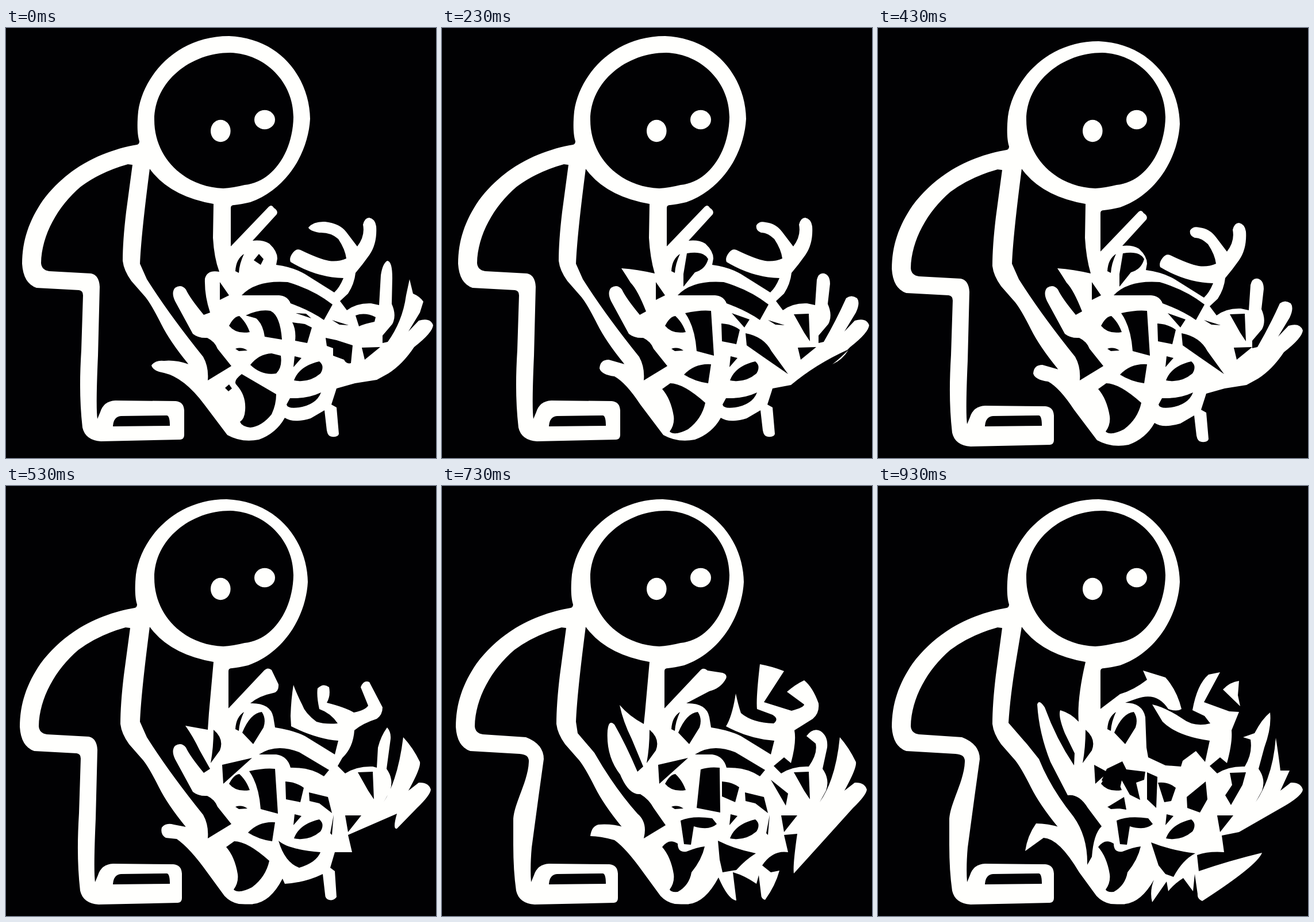
These frames come from a looping animation (748x748 px, 1030 ms). An HTML page:

```html
<!DOCTYPE html>
<html lang="en">
<head>
<meta charset="utf-8">
<title>Stick figure with a bundle</title>
<style>
  html, body { margin: 0; width: 100%; height: 100%; overflow: hidden; background: #010103; }
  svg { display: block; width: 100vw; height: 100vh; }
</style>
</head>
<body>
<svg viewBox="0 0 748 748">
  <g fill="#fffffd"><path id="body"/><path id="bundle"/></g>
  <path id="gaps" fill="#010103"/>
  <g fill="#fffffd">
    <ellipse cx="373.3" cy="179" rx="17.3" ry="19.3"/>
    <ellipse cx="450" cy="159.5" rx="18" ry="16.7"/>
  </g>
</svg>
<script>
const el = id => document.getElementById(id);
const LOOP = 1030, FIRST = 30, STEP = 100;
const HOME = 'translate(0 0)', LOW = 'translate(-4 9)';

// Body: back, leg, shoe and arm around the head.
const head = 'M391 381 L391 313 Q391 308 397 308 Q408 307 425 303 C490 280 526 215 529 158 C528 90 480 18 388 14 C295 14 238 85 230 145 C228 165 228 185 232 197 Q232 202 228 203';
const back = 'C175 212 110 238 64 300 C40 335 28 370 28 410 Q30 444 53 452';
const shoe = 'Q138 717 165 719 L303 716 Q310 715 310 708 V665 Q309 650 295 649 L190 648 Q170 649 164 668 L159 680';
const arm = 'L75 423 Q62 421 61 409 C62 360 90 310 130 276 Q165 250 212 237 L220 238 L209 320 Q203 370 203 405 Q205 422 218 440 L239 464 Q250 475 270 515 Q285 545 316 583 L351 640Z';
const legs = {
  straight: ['L127 456 Q134 457 134 465 L131 560 C128 610 128 650 133 695', 'Q156 660 160 570 L163 450 Q162 430 148 427'],
  bent: ['L139 457 Q156 458 155 471 C154 505 128 545 128 573 V615 Q128 660 133 695', 'Q157 655 160 620 L172 531 L181 466 Q181 440 150 428']
};
const makeBody = ([outer, inner]) => head + back + outer + shoe + inner + arm;

// Bundle silhouettes.
const twigs = (tip, stem, fork, edge, hand) =>
  'M388 383 L457 311 Q462 306 466 313 Q474 318 471 324 L429 370 Q446 368 458 375 Q472 388 472 401 L470 412 Q500 416 520 428 L571 460 Q580 452 587 435 Q540 434 495 407 Q492 400 499 391 Q505 383 512 386 Q545 402 562 405 Q578 407 592 401 Q590 385 578 367 ' +
  tip + ' Q581 340 592 355 L611 380 Q625 362 621 342 Q624 330 632 330 Q642 332 644 345 Q646 375 632 395 Q620 412 608 426 Q606 445 595 462 L581 475 L593 491 Q610 478 635 479 L649 482 ' +
  stem + ' L671 480 Q680 500 672 515 L655 535 L655 548 L664 546 ' + fork +
  ' L700 528 L718 509 Q738 503 743 517 Q742 530 710 555 ' + edge +
  ' L575 627 L566 655 L575 660 L579 706 Q578 712 567 711 Q560 711 558 700 L554 665 L530 679 Q500 688 485 678 Q470 705 440 716 Q410 722 385 708 L345 655 ' + hand;
const roundTip = 'Q565 355 555 356 Q545 352 547 343 Q552 335 563 338';
const roundStem = 'L652 438 Q655 425 665 427 Q675 430 675 445';
const roundFork = 'Q685 510 703 470 Q712 463 722 470 Q728 478 720 495';
const roundHand = 'Q320 617 300 606 Q277 603 274 592 Q275 577 290 577 L318 585Z';
const fullEdge = 'Q690 585 665 601 L645 612 L607 618';

const bundle = {
  pointed: twigs('Q565 355 545 356 Q528 353 526 347 Q535 336 555 337',
    'L652 430 Q655 410 663 405 Q672 405 672 435',
    'Q690 510 696 465 L702 437 L708 462 Q720 467 726 476 L720 495',
    fullEdge, 'Q310 608 275 600 Q256 597 253 587 Q260 577 275 579 Q295 577 318 585Z'),
  round: twigs(roundTip, roundStem, roundFork, fullEdge, roundHand),
  cut: twigs(roundTip, roundStem, roundFork, 'L705 560 Q650 585 607 621', roundHand) +
    'M707 560 Q697 577 679 585 Q692 575 707 560Z'
};

const midStrand = 'Q460 377 465 402 L468 420 Q500 425 520 435 L572 467 L578 443';
const rightFork = 'Q722 490 700 530 L718 516 Q735 515 739 528 Q738 538 715 560';
const knot = 'Q430 728 405 727 Q390 724 380 713 L350 672';
const joint = 'L577 487 L590 500 Q610 487 638 488';
const stemBase = 'L662 492 Q675 510 668 530 L657 550';

bundle.sharp =
  'M384 390 L448 322 Q455 314 462 320 L474 345 Q475 358 465 360 Q440 365 425 378 ' + midStrand +
  'Q540 440 496 418 L495 400 Q496 370 500 346 Q505 360 515 380 Q520 395 540 410 Q555 415 577 413 Q565 395 545 388 Q540 365 542 352 Q552 342 562 350 Q565 365 558 377 Q590 385 605 394 Q625 390 630 382 L617 350 Q622 337 632 341 L655 385 Q655 398 645 405 Q620 413 606 425 Q604 455 585 473' +
  joint + 'L645 490 L647 455 Q652 435 663 420 Q670 428 669 440' + stemBase +
  'Q682 510 691 437 Q708 455 720 480' + rightFork +
  'L680 596 Q672 598 680 570 L595 607 L602 637 L572 637 L564 664 L572 670 L575 715 Q570 722 562 720 Q555 718 555 710 L551 675 Q520 690 485 692 L481 683 Q460 724 430 727' + knot +
  'Q320 630 297 614 L278 612 Q268 606 271 594 Q278 585 292 589 L318 594Z';

bundle.flared =
  'M384 390 L450 320 Q455 315 462 321 L488 325 Q497 328 494 335 Q485 352 465 357 L425 378 ' + midStrand +
  'Q535 440 494 418 Q505 400 511 361 Q515 380 520 395 Q540 412 577 413 Q587 405 575 398 L548 388 Q546 370 553 310 Q575 314 595 322 L560 376 L608 391 Q630 385 630 380 L600 358 Q615 345 630 338 Q645 350 655 378 Q657 395 645 405 L613 425 Q617 445 607 482 L595 472' +
  joint + 'Q654 465 650 448 L634 435 Q645 420 658 426 Q672 435 670 455' + stemBase +
  'Q685 510 692 437 Q708 455 720 480' + rightFork +
  'Q670 610 612 674 Q610 660 618 605 L595 607 L602 637 Q575 633 557 660 L572 672 L587 669 Q580 695 562 720 Q555 718 555 710 L551 677 L547 692 Q525 677 506 672 L512 721 Q498 720 481 681 Q458 724 430 727' + knot +
  'Q320 630 300 616 Q275 609 258 609 Q260 592 272 589 Q295 587 318 594Z';

bundle.torn =
  'M384 390 L421 362 Q445 355 468 337 L461 321 L500 333 Q520 355 528 388 Q520 393 505 388 Q485 357 450 370 L430 377 Q460 377 465 402 L467 455 L470 472 L500 486 L527 488 L530 478 L553 461 L569 480 L577 443 Q520 435 495 410 L477 380 Q500 385 530 405 Q550 420 578 413 L568 400 L547 390 Q555 345 575 328 L595 324 L567 376 L611 392 L628 393 L615 425 Q617 445 607 482 L595 472' +
  joint + 'Q652 465 648 441 L635 437 L655 430 Q668 405 682 394 Q685 420 672 455' + stemBase +
  'Q687 505 692 438 Q697 470 700 495 L716 495 L700 530 L718 516 Q735 515 739 528 Q738 538 710 555 ' +
  'L628 602 L598 608 L602 637 Q575 635 555 642 L558 670 Q610 652 668 638 Q660 660 564 722 Q555 718 556 710 L551 675 L548 705 L531 682 Q515 692 505 705 L502 688 L477 724 Q472 705 480 685 Q458 724 430 727' + knot +
  'Q315 613 288 612 L256 635 Q260 608 275 587 Q295 587 318 594Z M600 354 Q612 341 628 339 L626 364 L630 383Z';

// Dark gaps; the space under the head reaches the twigs on the left.
const fixed = 'M500 155 C499 215 465 268 415 273 Q395 278 378 279 C312 277 258 227 258 160 C258 93 321 43 390 43 C452 45 500 95 500 155Z M186 693 Q187 676 200 675 L280 674 Q285 675 285 692Z M388 518 Q396 502 406 501 Q418 512 424 529 Q400 533 388 518Z M399 558 Q410 554 420 561 L405 562Z M399 423 Q400 402 414 393 Q406 410 405 426Z';
const chest = 'M250 245 Q285 293 361 306 ';
const leftTwig = 'L344 499 Q320 470 313 455 Q305 445 294 452 Q287 460 294 475 L325 532 Q335 540 350 539 Q363 545 368 558 L392 588 L351 613 Q353 590 343 572 ';
const armSide = 'Q285 500 245 437 L233 410 Q235 360 250 245Z ';
const space = {
  loop: chest + 'L360 365 Q362 400 371 424 Q350 420 346 436 Q345 465 355 495 ' + leftTwig + armSide,
  spike: chest + 'L360 365 Q362 400 370 427 Q340 420 312 418 Q320 430 328 443 Q340 455 355 493 ' + leftTwig + armSide,
  narrow: chest + 'L353 395 L351 424 L312 417 Q325 435 337 460 L355 492 ' + leftTwig + armSide,
  split: chest + 'L353 395 L351 414 Q325 400 309 381 Q315 410 330 440 L350 488 L340 497 Q320 450 300 415 Q290 405 288 425 Q285 470 310 502 Q325 538 345 536 Q360 545 368 560 L389 590 L351 613 Q358 585 340 570 Q300 525 265 464 L236 430 L233 410 Q235 360 250 245Z ',
  wide: chest + 'Q346 370 349 410 Q335 395 317 390 Q313 400 325 430 L342 465 L341 486 Q310 440 290 385 Q280 370 277 380 Q280 430 300 480 L330 538 Q350 535 365 560 L389 592 Q375 605 372 645 L364 659 Q365 610 340 575 Q300 525 280 475 L260 450 L227 412 Q230 365 240 305 L250 245Z '
};

const eyelet = {
  small: 'M440 393 L448 402 L443 412 L431 404Z ',
  sliver: 'M463 384 L440 411 L431 405 Q434 396 445 393Z ',
  large: 'M420 428 L426 392 Q455 387 463 402 Q458 420 440 425 L420 450Z ',
  leaf: 'M411 429 Q425 395 445 393 Q453 405 448 420 L430 449Z '
};

const arch = 'M410 465 Q435 438 490 442 Q535 455 568 481 L553 508 Q530 492 495 479 Q490 466 475 465Z M372 442 L388 465 L372 473Z ';
const sole = 'M494 644 Q525 645 548 634 Q540 655 510 660 Q490 663 488 655Z ';
const notch = 'M619 556 L651 555 L624 577Z ';
const bean = 'M501 613 Q510 588 545 580 Q555 588 547 601 Q527 618 501 613Z M502 571 L514 574 L500 590Z ';
const wovenGaps = arch + sole + notch + bean +
  'M417 500 Q440 489 460 492 Q477 500 480 542 L450 537 Q447 515 435 505Z M498 512 L520 515 L532 521 L524 548 L503 544 Q505 525 498 512Z M556 539 L575 543 L603 552 L600 583 Q592 585 588 577 L569 570 L569 557 L558 553Z M425 586 Q440 567 462 566 L478 570 Q481 590 470 601 Q445 605 425 586Z ' +
  'M608 500 Q625 494 643 503 L641 511 Q625 514 614 519Z M410 602 L470 637 Q470 655 462 672 Q445 693 425 695 Q410 693 407 685 Q415 680 416 665 Q418 640 402 622 Q393 615 410 602Z M381 626 L388 620 L393 627 L387 632Z M567 508 L596 517 L580 516Z M504 496 L531 505 L522 497Z';

const bowl = 'M383 628 L397 618 Q420 618 458 652 Q452 680 428 698 Q405 710 396 702 Q405 690 403 675 Q398 645 383 628Z ';
const column = 'M423 496 Q450 490 468 492 L473 570 L443 562 Q440 520 423 496Z ';
const pane = 'M486 514 Q505 515 518 525 L512 550 L487 545Z ';
const cap = 'M421 603 Q440 583 468 585 L463 618 Q440 615 421 603Z ';
const slot = 'M612 498 L638 497 L640 545 L630 530Z ';
const looseGaps = arch + sole + notch + bean + bowl + column + pane + cap + slot +
  'M528 531 Q560 537 573 562 L602 602 L560 573 L530 552Z M567 508 L596 517 L580 516Z M504 496 L526 521 L535 507Z ';

const brokenArch = 'M440 467 Q470 447 510 463 L562 494 L553 505 Q530 489 495 490 Q490 470 470 467Z ';
const crack = 'M361 424 Q380 440 372 460 L356 482 Q361 455 361 424Z ';
const wedges = crack + 'M376 485 L428 473 L378 518Z ';
const flag = 'M590 573 L618 573 L595 602Z ';
const tear = 'M527 533 L560 541 L567 569 L545 552 L528 548Z M564 604 L570 572 L567 607Z ';
const sharpGaps = brokenArch + wedges + flag + tear + bowl + column + pane + cap + slot + bean +
  'M474 617 Q490 632 547 637 Q540 655 510 664 Q485 655 474 617Z ';
const hook = 'M415 582 Q435 573 470 578 L478 588 Q465 600 438 592 L433 624 L421 623Z ';
const crook = 'M383 628 Q395 612 410 622 Q410 638 425 636 Q445 628 457 627 Q452 650 434 672 Q430 695 410 706 Q398 707 396 702 Q405 690 403 675 Q398 645 383 628Z ';
const flaredGaps = brokenArch + wedges + flag + tear + crook + hook + slot + bean +
  'M450 493 Q465 488 483 490 L484 568 L443 560Z M487 514 Q505 515 517 524 L510 550 L487 540Z M480 617 Q510 632 546 639 Q528 650 512 668 L488 672 L483 650Z M572 511 L602 535 L598 556Z ';
const tornGaps = crack + flag + crook + hook + bean +
  'M376 485 L400 498 L378 518Z M398 492 L425 479 L432 493 L465 497 L463 511 L449 516 L456 546 L438 537 L424 512 L420 530 L389 512Z M400 558 L428 541 L432 563Z ' +
  'M468 498 L486 506 L484 560 L468 545Z M487 516 Q505 514 518 525 L510 548 L498 550Z M537 541 L570 514 L573 545 L560 568 L538 560Z ' +
  'M475 620 Q510 634 552 639 Q530 650 514 680 L500 675 L488 660Z M612 499 L640 498 L634 520 L614 555 L604 538 L616 520Z ';

const pose = (shift, leg, shape, bundleShift, gaps) => ({ shift, body: makeBody(legs[leg]), shape: bundle[shape], bundleShift, gaps: fixed + gaps });
const high = (shape, gaps) => pose(HOME, 'straight', shape, HOME, gaps);
const low = (leg, shape, gaps) => pose(LOW, leg, shape, shape === 'round' ? LOW : HOME, gaps);
const poses = [
  high('pointed', space.loop + eyelet.small + wovenGaps),
  high('round', space.loop + eyelet.small + wovenGaps),
  high('round', space.spike + eyelet.sliver + wovenGaps),
  high('cut', space.spike + eyelet.large + looseGaps),
  low('straight', 'round', space.spike + eyelet.sliver + looseGaps),
  low('straight', 'round', space.spike + eyelet.large + looseGaps),
  low('straight', 'sharp', space.narrow + eyelet.leaf + sharpGaps),
  low('straight', 'flared', space.narrow + eyelet.leaf + sharpGaps),
  low('bent', 'flared', space.split + eyelet.leaf + flaredGaps),
  low('bent', 'flared', space.wide + eyelet.leaf + flaredGaps),
  low('bent', 'torn', space.wide + eyelet.leaf + tornGaps)
];

let shown = -1;
function draw(time) {
  const t = time % LOOP;
  const index = t < FIRST ? 0 : 1 + Math.floor((t - FIRST) / STEP);
  if (index === shown) return;
  shown = index;
  const p = poses[index];
  el('body').setAttribute('d', p.body);
  el('body').setAttribute('transform', p.shift);
  el('bundle').setAttribute('d', p.shape);
  el('bundle').setAttribute('transform', p.bundleShift);
  el('gaps').setAttribute('d', p.gaps);
}

const start = performance.now();
function tick() {
  draw(performance.now() - start);
  requestAnimationFrame(tick);
}
tick();
</script>
</body>
</html>
```
